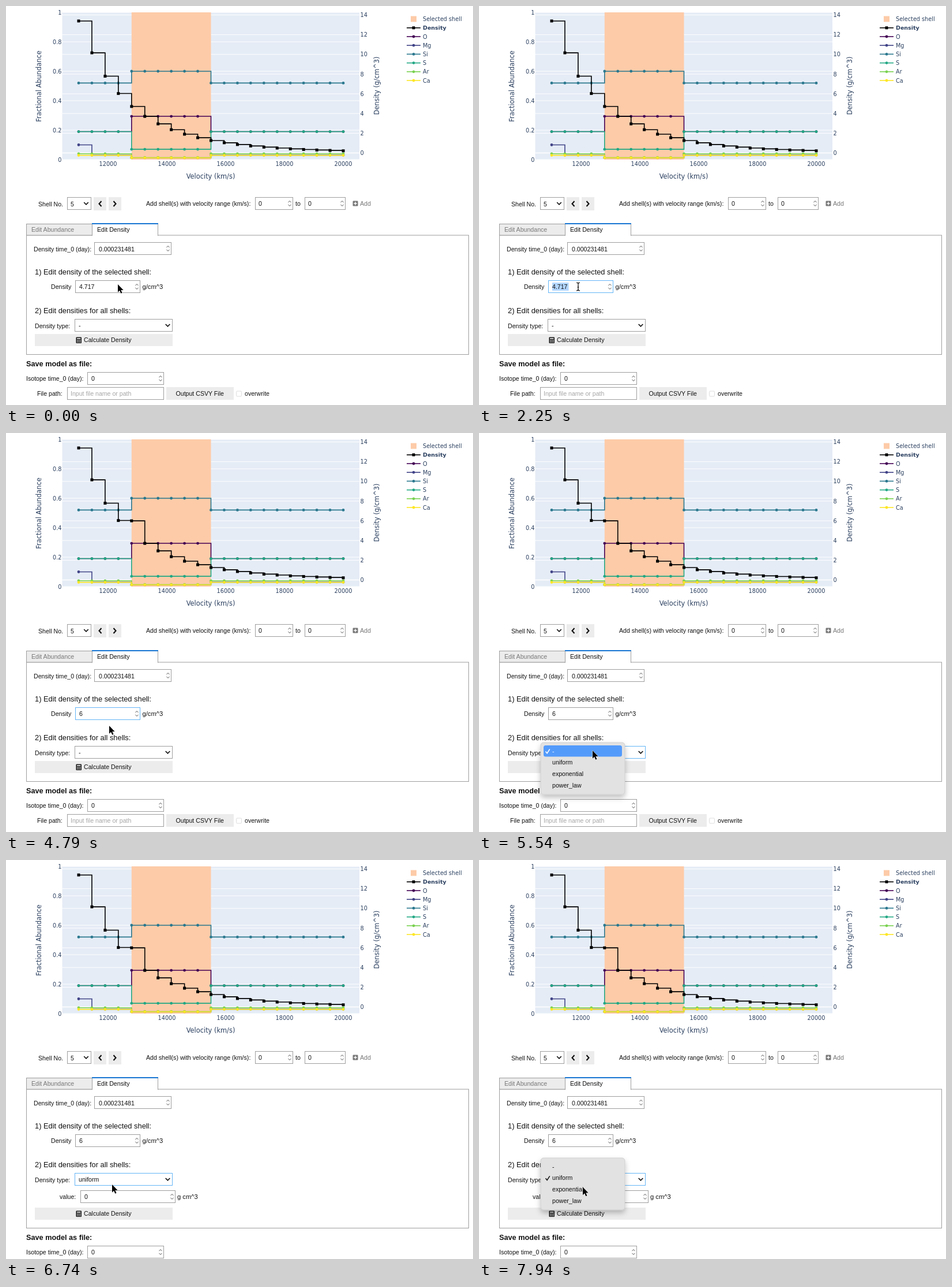
An HTML page for the animation above (8000 ms loop, 810 px wide and 691 px high).

```html
<!DOCTYPE html>
<html lang="en">
<head>
<meta charset="utf-8">
<title>Density editor</title>
<style>
  html, body { margin: 0; width: 100%; height: 100%; overflow: hidden; background: #fff; }
  svg { display: block; width: 810px; height: 691px; }
  text { font: 10.6px "Liberation Sans", Arial, sans-serif; fill: #111; white-space: pre; }
  .h { font-size: 12.85px; }
  .b { font-size: 12.7px; font-weight: bold; }
  .unit { font-size: 11.2px; }
  .dim { fill: #777; }
  .ph { fill: #a6a6a6; }
  .c { font: 9.7px "DejaVu Sans", Verdana, sans-serif; fill: #2a3f5f; }
  .axis { font-size: 11.4px; }
  .strong { font-size: 9.5px; font-weight: bold; }
  .end { text-anchor: end; }
  .mid { text-anchor: middle; }
  .box { fill: #fff; stroke: #9e9e9e; }
  .focus { stroke: #64b5f6; }
  .btn { fill: #ececec; }
  .chev { fill: none; stroke: #111; stroke-width: 1.7; }
  .spin { fill: none; stroke: #555; stroke-width: 1; }
  .hot { fill: #fff; }
</style>
</head>
<body>
<svg id="stage" viewBox="0 0 810 691" xmlns="http://www.w3.org/2000/svg"></svg>
<script>
const LOOP = 8000;
const $ = id => document.getElementById(id);
const range = n => [...Array(n).keys()];

// ---- drawing helpers ----
const text = (x, y, s, cls = '', more = '') =>
  `<text x="${x}" y="${y}" class="${cls}" ${more}>${s}</text>`;
const rect = (x, y, w, h, cls = '', more = '') =>
  `<rect x="${x}" y="${y}" width="${w}" height="${h}" class="${cls}" ${more}/>`;
const path = (d, cls = '', more = '') => `<path d="${d}" class="${cls}" ${more}/>`;
const group = (id, ...parts) => `<g id="${id}">${parts.join('')}</g>`;

const field = (x, y, w, id = '') =>
  rect(x + .5, y + .5, w - 1, 21, 'box', id && `id="${id}"`);
const spinner = (x, y) =>
  path(`M${x - 2.5} ${y - 1.8}l2.5 -2.7l2.5 2.7M${x - 2.5} ${y + 1.8}l2.5 2.7l2.5 -2.7`, 'spin');
const number = (x, y, w, id) => field(x, y, w, id) + spinner(x + w - 6, y + 11);
const down = (x, y) => path(`M${x - 3.8} ${y - 2}l3.8 3.8l3.8 -3.8`, 'chev');

// ---- chart ----
const FIRST = 126, STEP = 22.95, LAST = 20, PLOT_L = 97.5, PLOT_R = 613;
const px = i => FIRST + STEP * i;
const fracY = f => 266 - 255 * f;
const densY = d => 254.5 - 17.07 * d;
const powerLaw = i => 13.39 * (11000 / (11000 + 450 * i)) ** 6.89;

function stepLine(ys) {
  return `M${FIRST} ${ys[0]}` + ys.slice(1).map((y, k) => `H${px(k + 1)}V${y}`).join('');
}
function series(color, value) {
  const ys = range(LAST + 1).map(i => fracY(value(i)));
  return `<g fill="${color}">` +
    path(stepLine(ys), '', `fill="none" stroke="${color}" stroke-width="1.6"`) +
    ys.map((y, i) => `<circle cx="${px(i)}" cy="${y}" r="2.4"/>`).join('') + '</g>';
}
const inside = (a, b) => i => i >= 4 && i < 10 ? a : b;

function density(id, shell) {
  const ys = range(LAST + 1).map(i => densY(i === 4 ? shell : powerLaw(i)));
  return group(id,
    path(stepLine(ys), '', 'fill="none" stroke="#000" stroke-width="1.6"'),
    ...ys.map((y, i) => rect(px(i) - 2.5, y - 2.5, 5, 5)));
}

const elements = [
  ['O', '#440154', inside(.294, .19)],
  ['Mg', '#414487', i => i ? inside(.012, .03)(i) : .1],
  ['Si', '#2a788e', inside(.6, .52)],
  ['S', '#22a884', inside(.07, .19)],
  ['Ar', '#7ad151', inside(.014, .04)],
  ['Ca', '#fde725', inside(.012, .029)],
];

function gridLine(y, w = 1) {
  return path(`M${PLOT_L} ${y}H${PLOT_R}`, '', `stroke="#fff" stroke-width="${w}"`);
}

function legend() {
  const row = i => 22.6 + 15.2 * i;
  const entry = (i, name, color, mark, cls = '') =>
    path(`M695 ${row(i)}H719`, '', `stroke="${color}" stroke-width="1.6"`) + mark +
    text(723, row(i) + 3.6, name, 'c ' + cls);
  return rect(702, 17.5, 10, 10, '', 'fill="#fdcba8"') +
    text(723, row(0) + 3.6, 'Selected shell', 'c') +
    entry(1, 'Density', '#000', rect(704.5, row(1) - 2.5, 5, 5), 'strong') +
    elements.map(([name, color], i) => entry(i + 2, name, color,
      `<circle cx="707" cy="${row(i + 2)}" r="2.4" fill="${color}"/>`)).join('');
}

function chart() {
  const left = range(6).map(i => i / 5), right = range(8).map(i => i * 2);
  return rect(PLOT_L, 11, PLOT_R - PLOT_L, 255, '', 'fill="#e5ecf6"') +
    left.map(f => gridLine(fracY(f))).join('') +
    right.map(d => gridLine(densY(d), d ? 1 : 1.6)).join('') +
    rect(px(4), 11, STEP * 6, 255, '', 'fill="#fdcba8"') +
    elements.map(([, color, value]) => series(color, value)).join('') +
    density('before', 4.717) + density('after', 6) +
    left.map(f => text(96.5, fracY(f) + 3.6, f, 'c end')).join('') +
    right.map(d => text(614.5, densY(d) + 3.6, d, 'c')).join('') +
    range(5).map(i => text(177 + 102 * i, 276.8, 12000 + 2000 * i, 'c mid')).join('') +
    text(355, 298.5, 'Velocity (km/s)', 'c axis mid') +
    text(0, 0, 'Fractional Abundance', 'c axis mid', 'transform="translate(61 139) rotate(-90)"') +
    text(0, 0, 'Density (g/cm^3)', 'c axis mid', 'transform="translate(646.5 138) rotate(-90)"') +
    legend();
}

// ---- form ----
function shellBar() {
  return text(56, 346.5, 'Shell No.') + field(106, 331, 42) + text(112, 346.5, '5') + down(139, 342) +
    rect(152, 331, 22, 23, 'btn') + rect(178, 331, 22, 23, 'btn') +
    path('M165.5 338l-4 4.5l4 4.5M186.5 338l4 4.5l-4 4.5', 'chev', 'style="stroke-width:2.1"') +
    text(243, 346, 'Add shell(s) with velocity range (km/s):') +
    number(432, 331, 66) + text(438, 346, '0') + text(502, 346, 'to') +
    number(518, 331, 71) + text(524, 346, '0') +
    rect(601.5, 337.5, 9, 9, '', 'rx="1.2" fill="#777"') +
    path('M606 339.3v5.4M603.3 342h5.4', '', 'stroke="#fff" stroke-width="1.4"') +
    text(614, 346, 'Add', 'dim');
}

function tabs() {
  return rect(35.5, 397, 767, 206.5, 'box', 'id="panel"') +
    rect(35.5, 377.5, 114, 19.5, 'box', 'style="fill:#ececec"') +
    text(44, 391, 'Edit Abundance', 'dim') +
    path('M149.5 398V377H263.5V398', '', 'fill="#fff" stroke="#9e9e9e"') +
    rect(149, 376, 115, 2, '', 'fill="#1976d2"') +
    text(158, 391.3, 'Edit Density');
}

function calculator() {
  const keys = range(9).map(k => rect(123 + k % 3 * 2.6, 578 + (k / 3 | 0) * 1.9, 1.7, 1.1, '', 'fill="#ececec"'));
  return rect(121.5, 573.5, 9.5, 10.5, '', 'rx="1" fill="#111"') +
    rect(123, 575, 6.6, 1.7, '', 'fill="#ececec"') + keys.join('');
}

function editor() {
  return text(48, 424.5, 'Density time_0 (day):') + number(153, 409, 134) + text(161, 424.5, '0.000231481') +
    text(50, 464.5, '1) Edit density of the selected shell:', 'h') +
    text(78, 490, 'Density') + number(120, 475, 113, 'shellField') +
    rect(127, 479, 28.5, 14, '', 'id="selection" fill="#b3d7ff"') +
    text(127, 490, '', '', 'id="shellValue"') +
    path('M134.5 479.5V492.5', '', 'id="caret" stroke="#000"') +
    text(236.5, 490, 'g/cm^3', 'unit') +
    text(50, 531.5, '2) Edit densities for all shells:', 'h') +
    text(50, 557.5, 'Density type:') + field(119, 542, 170, 'typeField') +
    text(126, 557, '', '', 'id="typeValue"') + down(280.5, 553) +
    group('valueRow', text(93, 586.5, 'value:'), number(129, 572, 165), text(136, 587, '0'),
      text(297, 587, 'g cm^3', 'unit'));
}

function footer() {
  return group('footer',
    rect(50, 568, 239, 21, 'btn'), calculator(), text(135, 582, 'Calculate Density'),
    text(35, 623.5, 'Save model as file:', 'b'),
    text(35, 649, 'Isotope time_0 (day):'), number(141, 634, 133), text(148, 649, '0'),
    text(54, 674.5, 'File path:'), field(106, 660, 168), text(112, 674.5, 'Input file name or path', 'ph'),
    rect(278, 660, 117, 22, 'btn'), text(294.5, 674.5, 'Output CSVY File'),
    rect(399.5, 667, 9, 9, '', 'rx="1.5" fill="#fff" stroke="#ddd"'),
    text(414, 674.5, 'overwrite'));
}

const options = ['-', 'uniform', 'exponential', 'power_law'];
const rowY = i => 541 + 19.8 * i;

function popup() {
  return group('popup',
    rect(107, 536, 146, 90, '', 'rx="5" fill="#e2e2e2" stroke="#c4c4c4" stroke-width=".7" filter="url(#shadow)"'),
    rect(112, 541, 136, 19.5, '', 'id="bar" rx="3.5" fill="#539bfb"'),
    path('M115.5 10.5l2.6 3.2l4.6 -7.2', '', 'id="check" fill="none" stroke-width="1.5"'),
    ...options.map((s, i) => text(127, rowY(i) + 13.5, s, 'opt')));
}

$('stage').innerHTML =
  `<defs><filter id="shadow" x="-20%" y="-25%" width="140%" height="160%">
     <feDropShadow dx="0" dy="5" stdDeviation="5" flood-opacity=".25"/></filter></defs>` +
  chart() + shellBar() + tabs() + editor() + footer() + popup() +
  path('M0 0V13.7L3.1 10.8L5.3 15.8L7.5 14.8L5.3 10H9.6Z', '', 'id="arrow" stroke="#fff" stroke-width="1" paint-order="stroke"') +
  path('M-3 -7q3 0 3 2V5q0 2 -3 2M3 -7q-3 0 -3 2M3 7q-3 0 -3 -2M-1.3 1h2.6', '', 'id="beam" fill="none" stroke="#000" stroke-width="1.2"');

// ---- timeline ----
const pointer = [
  [0, 194, 482], [750, 193.5, 482.5], [900, 191, 483], [1050, 188, 483.5], [1200, 184, 484.5],
  [1350, 179, 485.5], [1500, 176, 486], [1650, 171, 486.5], [1800, 172, 486, 'beam'],
  [2700, 171, 486, 'beam'], [4790, 179, 507], [4940, 191, 535], [5090, 197, 550],
  [5840, 188, 561], [5990, 181, 568], [6740, 184, 562], [6890, 188, 555], [7040, 189, 552.5],
  [7490, 186, 558], [7640, 182, 564], [7790, 180, 566.5],
];
// Time, highlighted row, opacity, checked row
const menu = [
  [0, -1, 0, 0], [5390, 0, 1, 0], [5840, 1, 1, 0], [6440, 1, .13, 0], [6590, -1, 0, 0],
  [7190, 1, 1, 1], [7640, 2, 1, 1], [7940, -1, 1, 1],
];
const at = (list, t) => list.findLast(step => step[0] <= t);
const show = (id, on) => $(id).setAttribute('visibility', on ? 'visible' : 'hidden');
const put = (id, x, y) => $(id).setAttribute('transform', `translate(${x} ${y})`);

function draw(t) {
  const between = (a, b) => t >= a && t < b;
  const uniform = t >= 6740, shift = uniform ? 34 : 0;

  show('before', t < 4050);
  show('after', t >= 4050);
  show('selection', between(2250, 3300));
  show('caret', between(3300, 3900) || between(4340, 4790));
  $('shellValue').textContent = t < 3300 ? '4.717' : '6';
  $('typeValue').textContent = uniform ? 'uniform' : '-';
  $('shellField').classList.toggle('focus', between(2250, 5390));
  $('typeField').classList.toggle('focus', t >= 5390);
  show('valueRow', uniform);
  put('footer', 0, shift);
  $('panel').setAttribute('height', 206.5 + shift);

  const [, hot, opacity, checked] = at(menu, t);
  $('popup').setAttribute('opacity', opacity);
  put('popup', 0, -20 * checked);
  $('bar').setAttribute('opacity', hot < 0 ? 0 : 1);
  $('bar').setAttribute('y', rowY(Math.max(hot, 0)));
  put('check', 0, rowY(checked));
  $('check').setAttribute('stroke', hot === checked ? '#fff' : '#111');
  document.querySelectorAll('.opt').forEach((el, i) => el.classList.toggle('hot', i === hot));

  const [, x, y, kind = 'arrow'] = at(pointer, t);
  for (const id of ['arrow', 'beam']) show(id, id === kind);
  put(kind, x, y);
}

function tick() {
  draw(performance.now() % LOOP);
  requestAnimationFrame(tick);
}
tick();
</script>
</body>
</html>
```
